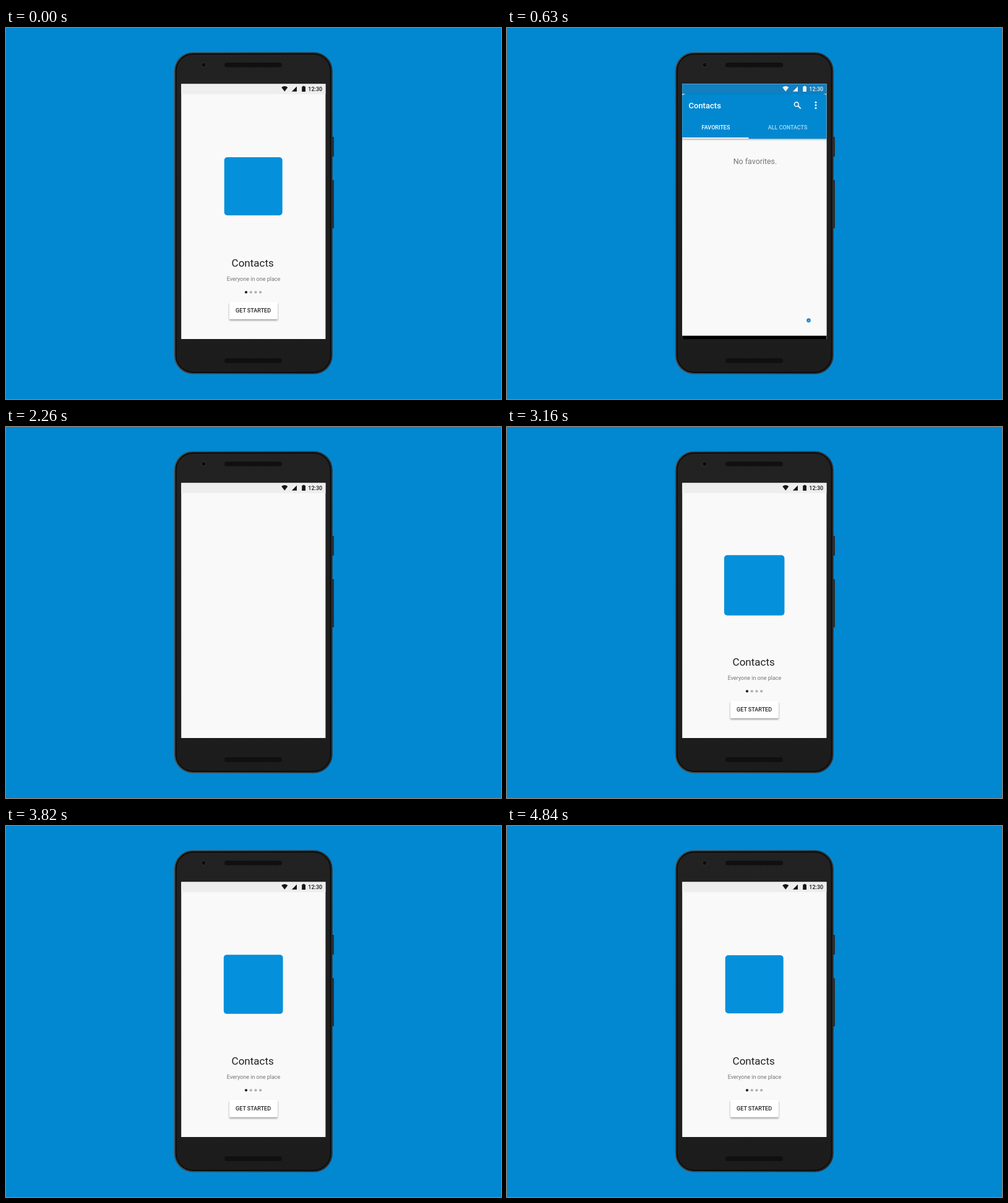
An HTML page for the animation above (5.34 s loop, 800 px wide and 600 px high).

```html
<!DOCTYPE html>
<html lang="en">
<head>
<meta charset="utf-8">
<title>Contacts</title>
<style>
  html, body { margin: 0; width: 100%; height: 100%; overflow: hidden; background: #0288d1; }
  svg { display: block; width: 100vw; height: 100vh; }
  text { font-family: Roboto, sans-serif; font-size: 9px; }
  .medium { font-weight: 500; }
  .mid { text-anchor: middle; }
  .raised { filter: drop-shadow(0 2px 1.6px rgba(0, 0, 0, .36)); }
  .bar { filter: drop-shadow(0 1px 1.5px rgba(0, 0, 0, .4)); }
</style>
</head>
<body>
<svg viewBox="0 0 800 600">
  <defs>
    <linearGradient id="shell" x2="0" y2="1">
      <stop offset="0" stop-color="#222"/>
      <stop offset="1" stop-color="#1c1c1c"/>
    </linearGradient>
    <linearGradient id="rim" x2="1" y2="0">
      <stop offset="0" stop-color="#47494b"/>
      <stop offset="1" stop-color="#2c2d2f"/>
    </linearGradient>
    <clipPath id="screen"><rect x="283.2" y="90.4" width="233.2" height="412.6"/></clipPath>
    <clipPath id="reveal"><circle id="hole" cx="400"/></clipPath>
    <g id="status">
      <path d="M450.3 102.8L445.2 96.1Q450.3 92 455.4 96.1Z"/>
      <path d="M461.8 102.7H470V94.4Z"/>
      <path d="M478.2 94.7H479.7V93.7H482.5V94.7H484V102.9H478.2Z"/>
      <text class="medium" x="488.3" y="101.6">12:30</text>
    </g>
  </defs>

  <rect width="800" height="600" fill="#0288d1"/>

  <g id="phone">
    <rect x="525" y="176" width="5" height="32" rx="1" fill="#2b2d2f"/>
    <rect x="525" y="246" width="5" height="78" rx="1" fill="#2b2d2f"/>
    <rect x="271.7" y="39.2" width="256" height="520.6" rx="30" fill="url(#rim)"/>
    <rect x="274.6" y="42" width="250" height="515" rx="27.5" fill="url(#shell)" stroke="#0b0b0b" stroke-width="1.8"/>
    <circle cx="319.5" cy="59.7" r="3.7" fill="#0c0c0c" stroke="#343434" stroke-width="1.2"/>
    <rect x="353" y="56" width="93" height="7.6" rx="3.8" fill="#101010"/>
    <rect x="353" y="534" width="93" height="8" rx="4" fill="#101010"/>
  </g>

  <g clip-path="url(#screen)">
    <rect x="283" y="90" width="234" height="413" fill="#f9f9f9"/>
    <rect x="283" y="90" width="234" height="17" fill="#eee"/>
    <use href="#status" fill="#161616"/>

    <g id="welcome">
      <rect id="icon" rx="5" fill="#0490da"/>
      <text id="title" class="mid" x="398.7" y="386" fill="#212121" style="font-size:17px">Contacts</text>
      <text id="tagline" class="mid" x="400" y="409.3" fill="#757575">Everyone in one place</text>
      <g id="dots" fill="#b0b0b0">
        <circle cx="388" cy="427.3" r="2.1" fill="#212121"/>
        <circle cx="395.8" cy="427.3" r="2.1"/>
        <circle cx="403.5" cy="427.3" r="2.1"/>
        <circle cx="411.2" cy="427.3" r="2.1"/>
      </g>
      <rect id="button" class="raised" x="361" y="443" width="78" height="28" rx="1.5" fill="#fff"/>
      <text id="label" class="medium mid" x="399.6" y="460" fill="#212121">GET STARTED</text>
    </g>

    <g id="app">
      <g clip-path="url(#reveal)">
        <rect x="283" y="106" width="234" height="397" fill="#f9f9f9"/>
        <rect class="bar" x="280" y="106" width="240" height="73" fill="#0288d1"/>
        <rect x="283" y="177" width="107.5" height="2" fill="#e8f4fb"/>
        <g fill="#fff">
          <text class="medium" x="293.5" y="129.8" style="font-size:13px">Contacts</text>
          <text class="medium mid" x="337.5" y="164.3">FAVORITES</text>
          <text class="medium mid" x="453.6" y="164.3" opacity=".7">ALL CONTACTS</text>
          <circle cx="499" cy="120.2" r="1.5"/>
          <circle cx="499" cy="124.8" r="1.5"/>
          <circle cx="499" cy="129.4" r="1.5"/>
        </g>
        <path d="M470.4 126L474.7 130.3" stroke="#fff" stroke-width="1.8"/>
        <circle cx="467.8" cy="123.4" r="3.4" fill="none" stroke="#fff" stroke-width="1.5"/>
        <text class="mid" x="401" y="220" fill="#757575" style="font-size:12.4px">No favorites.</text>
      </g>
      <g id="blueStatus">
        <rect x="283" y="90" width="234" height="16.5" fill="#0277bd"/>
        <use href="#status" fill="#fff"/>
      </g>
      <g id="fab" class="raised">
        <circle r="18.3" fill="#0a8ad3"/>
        <g transform="scale(.68) translate(-12 -12)" fill="#fff">
          <circle cx="15" cy="8" r="4"/>
          <path d="M15 14c-2.67 0-8 1.34-8 4v2h16v-2c0-2.66-5.33-4-8-4zM6 10V7H4v3H1v2h3v3h2v-3h3v-2z"/>
        </g>
      </g>
      <g id="nav">
        <rect x="283" y="472" width="234" height="32"/>
        <g fill="none" stroke="#fff" stroke-width="1.8" stroke-linejoin="round">
          <path d="M339.2 483.2V492.6L330.6 487.9Z"/>
          <circle cx="399.5" cy="487.9" r="4.7"/>
          <rect x="460" y="483.3" width="9.3" height="9.2"/>
        </g>
      </g>
    </g>
  </g>
</svg>

<script>
const LOOP = 5340, STEP = 30, RESET = 2260, ICON = 94;
const SLACK = 10; // keeps clock jitter from showing the previous step
const $ = id => document.getElementById(id);
const span = (t, from, to) => Math.min(1, Math.max(0, (t - from) / (to - from)));
const easeOut = u => 1 - (1 - u) ** 2;
const easeInOut = u => (1 - Math.cos(Math.PI * u)) / 2;
const set = (id, attrs) => {
  for (const name in attrs) $(id).setAttribute(name, attrs[name]);
};

function drawApp(t) {
  const open = easeInOut(span(t, 30, 690));
  set("hole", { cy: 457 - 114 * open, r: 267 * open });
  set("blueStatus", { opacity: span(t, 360, 660) });

  const rise = easeOut(span(t, 590, 1145));
  set("nav", { transform: `translate(0 ${31 * (1 - rise)})` });
  set("fab", { transform: `translate(487.5 ${443.7 + 35 * (1 - rise)}) scale(${rise})` });
}

function iconSize(t) {
  const grow = easeOut(span(t, 2370, 2790));
  const pulse = (from, to, amount) => amount * Math.sin(Math.PI * span(t, from, to));
  return ICON * grow + pulse(2800, 3340, 4) + pulse(3340, 3880, 5) + pulse(3880, 4840, 3);
}

function drawWelcome(t) {
  const intro = t >= RESET;
  const size = intro ? iconSize(t) : ICON;
  set("icon", { x: 399.7 - size / 2, y: 256 - size / 2, width: size, height: size });

  const fade = (id, from, to) => set(id, { opacity: intro ? easeOut(span(t, from, to)) : 1 });
  fade("icon", 2370, 2600);
  fade("button", 2400, 2770);
  fade("title", 2450, 2950);
  fade("tagline", 2500, 3000);
  fade("dots", 2550, 3050);
  fade("label", 2550, 3050);
}

function draw(now) {
  // The reset lands 10 ms past a step boundary, so steps are counted from it.
  const phase = RESET % STEP;
  const step = Math.floor((now + SLACK - phase) / STEP) * STEP + phase;
  const t = Math.max(0, step) % LOOP;
  $("app").style.display = t < RESET ? "" : "none";
  drawApp(t);
  drawWelcome(t);
}

const start = performance.now();
function tick() {
  draw(performance.now() - start);
  requestAnimationFrame(tick);
}
tick();
</script>
</body>
</html>
```
